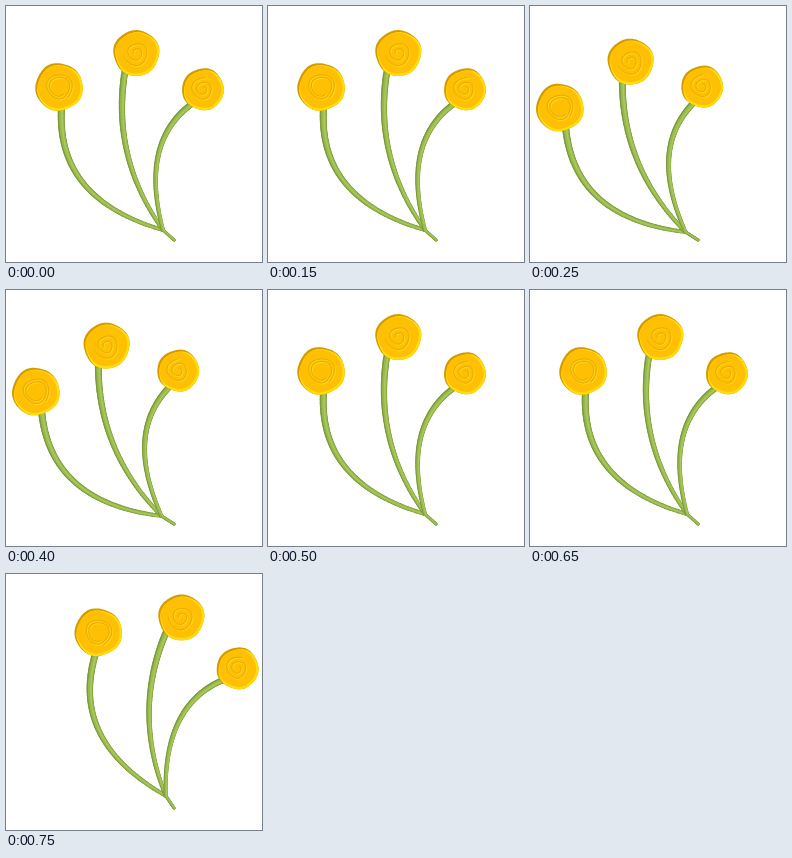
Animation of 256 by 256 pixels, one loop 1000 ms. Source, as an HTML page with a canvas:

```html
<!DOCTYPE html>
<html>
<head>
<meta charset="utf-8">
<title>Swaying flowers</title>
<style>
html, body { margin: 0; width: 100%; height: 100%; overflow: hidden; background: #fff; }
canvas { display: block; width: 256px; height: 256px; }
</style>
</head>
<body>
<canvas id="stage" width="256" height="256"></canvas>
<script>
const ctx = document.getElementById('stage').getContext('2d');
const TAU = Math.PI * 2;
const TIP = [168, 234];
const ROOT = [157, 224];

// The whole bunch leans around its tip, one step every quarter of the loop
const LEANS = [0, -9.3, 0, 13.6];

// Each stem runs from top through bend to the shared root
const flowers = [
  { head: [53, 81], r: 23.7, top: [55.5, 102], bend: [78, 178], core: 0.36 },
  { head: [130.3, 47], r: 22.9, top: [118.8, 66], bend: [121.5, 148], core: 0.12 },
  { head: [197, 83.3], r: 20.9, top: [187, 97], bend: [152.5, 148], core: 0.12 }
];

function turn([x, y], angle) {
  const dx = x - TIP[0], dy = y - TIP[1];
  const c = Math.cos(angle), s = Math.sin(angle);
  return [TIP[0] + dx * c - dy * s, TIP[1] + dx * s + dy * c];
}

// Point on the quadratic that passes through mid at t = 0.5
function curve(a, mid, b, t) {
  const u = 1 - t;
  return a.map((v, i) => {
    const control = 2 * mid[i] - (v + b[i]) / 2;
    return u * u * v + 2 * u * t * control + t * t * b[i];
  });
}

function stemLine(flower, angle, scale, color, shift) {
  const n = 48;
  const width = flower.r * 0.3;
  ctx.strokeStyle = color;
  ctx.lineCap = 'round';
  let [px, py] = turn(flower.top, angle);
  for (let i = 1; i <= n + 1; i++) {
    const point = i > n ? TIP : curve(flower.top, flower.bend, ROOT, i / n);
    const [x, y] = turn(point, angle);
    ctx.lineWidth = scale * (i > n ? 3 : width + (4 - width) * i / n);
    ctx.beginPath();
    ctx.moveTo(px + shift, py + shift / 2);
    ctx.lineTo(x + shift, y + shift / 2);
    ctx.stroke();
    [px, py] = [x, y];
  }
}

function drawStem(flower, angle) {
  stemLine(flower, angle, 1, '#7b9a3a', 0);
  stemLine(flower, angle, 0.68, '#98b94e', 0.4);
  stemLine(flower, angle, 0.24, '#aac85c', 0.9);
}

function blob(x, y, r, phase, color) {
  ctx.beginPath();
  for (let a = 0; a < TAU; a += 0.08) {
    const d = r * (1 + 0.014 * Math.sin(3 * a + phase) + 0.014 * Math.sin(5 * a - phase));
    ctx.lineTo(x + d * Math.cos(a), y + d * Math.sin(a));
  }
  ctx.closePath();
  ctx.fillStyle = color;
  ctx.fill();
}

function swirl(x, y, r, core, phase, color, width) {
  const end = 2 * TAU;
  ctx.beginPath();
  for (let a = 0; a <= end; a += 0.12) {
    const d = r * (core + (0.58 - core) * a / end) * (1 + 0.05 * Math.sin(3 * a));
    ctx.lineTo(x + d * Math.cos(a + phase), y + d * Math.sin(a + phase));
  }
  ctx.strokeStyle = color;
  ctx.lineWidth = width;
  ctx.stroke();
}

// Light comes from the lower right, whatever the lean
function drawHead({ head, r, core }, angle, phase) {
  const [x, y] = turn(head, angle);
  blob(x, y, r, phase, '#d39b00');
  ctx.save();
  ctx.clip();
  blob(x + 1.3, y + 1.3, r - 0.6, phase, '#ffdd0c');
  blob(x, y, r - 2.4, phase, '#ffc003');
  ctx.restore();
  swirl(x + 0.8, y + 0.8, r, core, phase, '#ffd51c', 1.4);
  swirl(x, y, r, core, phase, '#eaac00', 1.1);
}

function draw(angle) {
  ctx.fillStyle = '#fff';
  ctx.fillRect(0, 0, 256, 256);
  flowers.forEach(f => drawStem(f, angle));
  flowers.forEach((f, i) => drawHead(f, angle, angle + 1 + 2 * i));
}

function tick() {
  const step = Math.floor(performance.now() % 1000 / 250);
  draw(LEANS[step] * TAU / 360);
  requestAnimationFrame(tick);
}
tick();
</script>
</body>
</html>
```
